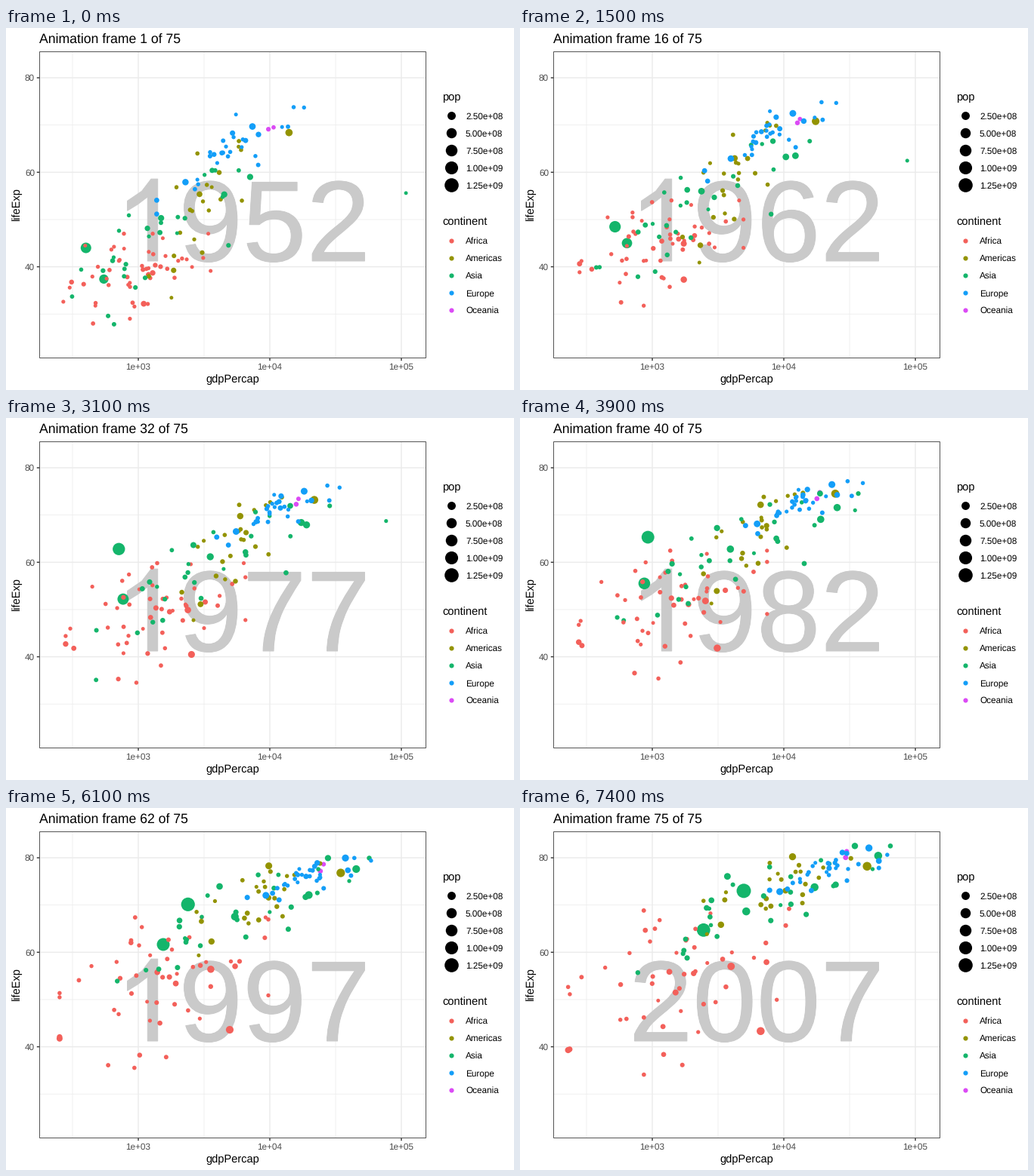
These frames come from a looping animation (672 by 480 pixels, 7.5 s). A matplotlib script:

```python
import numpy as np
import matplotlib.pyplot as plt
from matplotlib.animation import FuncAnimation
from matplotlib.patches import Polygon, Rectangle
from matplotlib.patheffects import withStroke

W, H, DPI = 672, 480, 100
FRAMES, INTERVAL = 75, 100
PT = 72 / DPI
YEARS = np.arange(1952, 2008, 5)
STEPS = np.arange(12)
KEYS = np.round(STEPS * (FRAMES - 1) / 11)
LEFT, RIGHT, TOP, BOTTOM = 44.5, 555.5, 31.5, 437.5

COLORS = {"Africa": "#F3605A", "Americas": "#939300", "Asia": "#14B56B",
          "Europe": "#139EF8", "Oceania": "#DB4AF5"}

plt.rcParams["font.family"] = "Liberation Sans"
plt.rcParams["text.hinting"] = "none"

# Each cloud: count, gdp/life correlation, median population (millions),
# population growth, and (log gdp, spread, life, spread) in 1952, 1982, 2007.
CLOUDS = {
    "Africa": (51, .45, 10, 3.8,
               [(2.99, .28, 39, 5), (3.16, .36, 51.6, 7), (3.2, .42, 54.8, 9)]),
    "Oceania": (2, 0, 9, 2.2,
                [(4.01, .02, 69.3, .2), (4.27, .02, 74.3, .5), (4.47, .08, 80.7, .5)]),
    "Americas": (24, .65, 9, 2.5,
                 [(3.48, .2, 53, 8.5), (3.79, .21, 66, 6.2), (3.93, .29, 73.5, 4.2)]),
    "Asia": (29, .75, 22, 2.8,
             [(3.17, .36, 46.8, 8.5), (3.66, .46, 63.2, 7.3), (3.85, .48, 71.3, 7)]),
    "Europe": (30, .85, 10, 1.35,
               [(3.7, .28, 64.5, 5.8), (4.15, .23, 72.8, 2.8), (4.35, .26, 77.6, 2.8)]),
}

# Paths that stand out: populations at both ends, (year, gdp, life) key points.
STANDOUTS = [
    ("Asia", 556, 1319, [(1952, 400, 44), (1957, 576, 50.5), (1962, 488, 44.5),
                         (1967, 613, 58.4), (1977, 741, 64), (1992, 1656, 68.7),
                         (2007, 4959, 73)]),
    ("Asia", 372, 1110, [(1952, 547, 37.4), (1972, 724, 50.7), (1987, 977, 58.6),
                         (2007, 2452, 64.7)]),
    ("Asia", .2, 2.5, [(1952, 108382, 55.6), (1967, 80895, 64.6), (1972, 109348, 67.7),
                       (1982, 31354, 71.3), (2007, 47307, 77.6)]),
    ("Asia", 4.7, 14, [(1952, 368, 39.4), (1972, 421, 40.3), (1977, 525, 31.2),
                       (1982, 624, 51), (2007, 1714, 59.7)]),
    ("Americas", 158, 301, [(1952, 13990, 68.4), (1982, 25010, 74.7),
                            (2007, 42952, 78.2)]),
    ("Africa", 2.5, 9, [(1952, 493, 40), (1987, 848, 44), (1992, 737, 23.6),
                        (1997, 590, 36.1), (2007, 863, 46.2)]),
]


def px(log_gdp):
    return 175 + 174 * (log_gdp - 3)


def py(life):
    return 66 + (80 - life) * 6.265


def area(pop):
    """Marker area in square points for a population in millions."""
    size = 1 + 5 * np.sqrt(np.asarray(pop) / 1319)
    return (2 * (1.4225 * size + .945) * PT) ** 2


def drift(rng, n, jitter):
    """Standard scores of n dots that slowly change rank, shape (12, n)."""
    a, b = rng.normal(size=(2, n))
    a, b = [(v - v.mean()) / v.std() for v in (a, b)]
    angle = .7 * STEPS[:, None] / 11
    return a * np.cos(angle) + b * np.sin(angle) + rng.normal(0, jitter, (12, n))


def cloud(rng, n, corr, median, growth, keys):
    """Log gdp, life and population of n dots at every step."""
    fit = np.polyfit((0, 6, 11), np.array(keys), 2)
    gdp, gdp_sd, life, life_sd = [np.polyval(c, STEPS)[:, None] for c in fit.T]
    zx = np.clip(drift(rng, n, .08), -2, 2)
    zy = corr * zx + np.sqrt(1 - corr ** 2) * drift(rng, n, .04)
    zy = np.clip(zy, -2.3, 1.6)
    end = np.minimum(median * np.exp(rng.normal(0, 1.2, n)), 220)
    return gdp + gdp_sd * zx, life + life_sd * zy, np.linspace(end / growth, end, 12)


def key_path(p0, p1, knots):
    year, gdp, life = np.array(knots, float).T
    cols = (np.interp(YEARS, year, np.log10(gdp)), np.interp(YEARS, year, life),
            np.linspace(p0, p1, 12))
    return [c[:, None] for c in cols]


rng = np.random.default_rng(7)
parts, colors = [], []
for name, *spec in STANDOUTS:
    parts.append(key_path(*spec))
    colors.append(COLORS[name])
for name, spec in CLOUDS.items():
    parts.append(cloud(rng, *spec))
    colors += [COLORS[name]] * spec[0]
steps = np.concatenate(parts, axis=2)  # (gdp, life, pop) x step x dot

fig = plt.figure(figsize=(W / DPI, H / DPI), dpi=DPI, facecolor="white")
ax = fig.add_axes([0, 0, 1, 1])
ax.set(xlim=(0, W), ylim=(H, 0))
ax.axis("off")


def text(x, y, s, size, color="black", **kw):
    return ax.text(x, y, s, fontsize=size * PT, color=color, **kw)


def line(xs, ys, width, color):
    ax.plot(xs, ys, color=color, lw=width * PT, solid_capstyle="butt",
            snap=False, zorder=1)


for width, xs, ys in ((.7, (2.5, 3.5, 4.5), (30, 50, 70)),
                      (1.42, (3, 4, 5), (40, 60, 80))):
    for v in xs:
        line([px(v)] * 2, [TOP, BOTTOM], width, "#EBEBEB")
    for v in ys:
        line([LEFT, RIGHT], [py(v)] * 2, width, "#EBEBEB")

for v in (3, 4, 5):
    line([px(v)] * 2, [BOTTOM, BOTTOM + 3.7], 1.42, "#333333")
    text(px(v), 453, f"1e+0{v}", 11.73, "#4D4D4D", ha="center")
for v in (40, 60, 80):
    line([LEFT - 3.7, LEFT], [py(v)] * 2, 1.42, "#333333")
    text(38, py(v) + 4.2, str(v), 11.73, "#4D4D4D", ha="right")

text(300, 470, "gdpPercap", 14.67, ha="center")
text(18, 234.5, "lifeExp", 14.67, ha="center", va="baseline",
     rotation=90, rotation_mode="anchor")

text(577, 96, "pop", 14.67)
for i in range(5):
    y, pop = 116.3 + 23.04 * i, 250 * (i + 1)
    ax.scatter(589, y, s=area(pop), c="black", lw=0)
    text(608, y + 4.4, f"{pop * 1e6:.2e}", 11.73)

text(577, 262, "continent", 14.67)
for i, (name, color) in enumerate(COLORS.items()):
    y = 281.7 + 23.04 * i
    ax.scatter(589, y, s=(6.16 * PT) ** 2, c=color, lw=0)
    text(608, y + 4.4, name, 11.73)

ax.add_patch(Rectangle((LEFT, TOP), RIGHT - LEFT, BOTTOM - TOP, fill=False,
                       ec="#555555", lw=PT, snap=False, zorder=5))
title = text(44, 20, "", 17.6)

# Large year: a footless "1" is drawn as a shape, the other digits are text.
GREY, EM, YEAR_X, YEAR_Y = "#CACACA", 152, 313, 309
bold = [withStroke(linewidth=PT, foreground=GREY)]
digits = [text(YEAR_X + (i - 1.5) * .556 * EM, YEAR_Y, "", EM, GREY, ha="center",
               zorder=2, path_effects=bold) for i in range(4)]
outline = np.array([(.373, 0), (.285, 0), (.285, .56), (.2, .495), (.109, .439),
                    (.109, .524), (.235, .61), (.316, .716), (.373, .716)])
one = Polygon(np.array([YEAR_X - 1.112 * EM, YEAR_Y]) + outline * (EM, -EM),
              fc=GREY, ec=GREY, lw=PT, zorder=2)
ax.add_patch(one)

dots = ax.scatter(*np.zeros((2, len(colors))), c=colors, lw=0, zorder=3)


def update(i):
    state = np.interp(i, KEYS, STEPS)
    k = min(int(state), 10)
    f = state - k
    gdp, life, pop = steps[:, k] * (1 - f) + steps[:, k + 1] * f
    dots.set_offsets(np.column_stack([px(gdp), py(life)]))
    dots.set_sizes(area(pop))
    title.set_text(f"Animation frame {i + 1} of {FRAMES}")
    label = str(YEARS[int(state + .5)])
    for digit, char in zip(digits, label):
        digit.set_text(char.replace("1", ""))
    one.set_visible(label[0] == "1")
    return dots, title, one, *digits


anim = FuncAnimation(fig, update, frames=FRAMES, interval=INTERVAL,
                     repeat=True, repeat_delay=0, blit=False)
plt.show()
```
